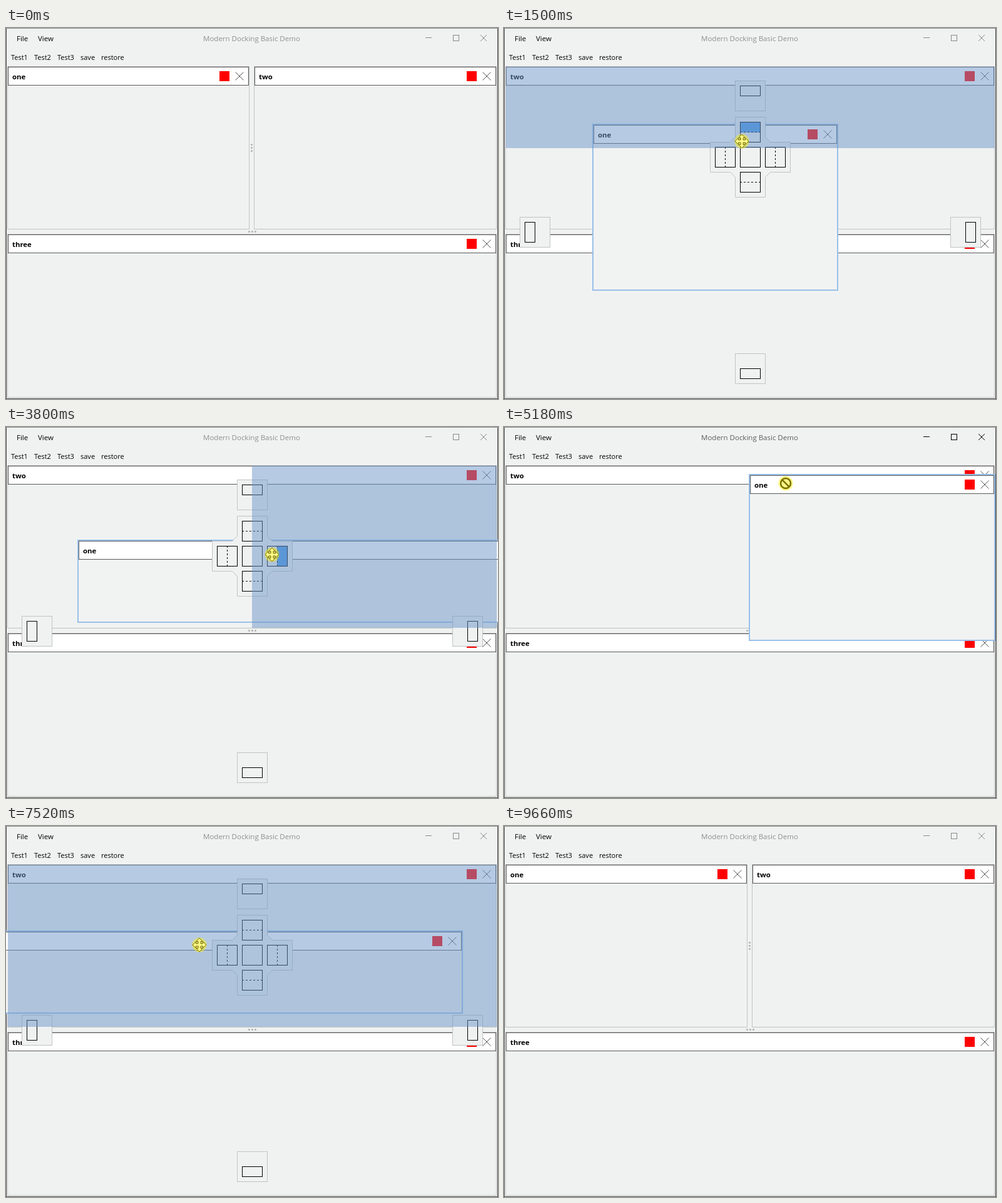
These frames come from a looping animation (786 by 593 pixels, 9760 ms). An HTML page with a canvas:

```html
<!DOCTYPE html>
<html lang="en">
<head>
<meta charset="utf-8">
<title>Docking demo</title>
<style>
html, body { margin: 0; width: 100%; height: 100%; overflow: hidden; background: #f0f2f2 }
canvas { display: block }
</style>
</head>
<body>
<canvas id="stage" width="786" height="593"></canvas>
<script>
const ctx = document.getElementById('stage').getContext('2d');
const LOOP = 9760, BG = '#f0f2f2', EDGE = '#c2c2c2', FONT = '"Open Sans", "Noto Sans", sans-serif';

const sides = { north: [0, -1], east: [1, 0], south: [0, 1], west: [-1, 0] };
const opposite = { north: 'south', east: 'west', south: 'north', west: 'east' };

// Panel slots: x, y, width, height
const whole = [2, 62, 782, 260], bottom = [2, 330, 782, 261];
const slots = {
  north: [2, 62, 782, 126], south: [2, 196, 782, 126],
  west: [2, 62, 387, 260], east: [396, 62, 388, 260]
};

// Panel "one" is dragged from its slot and dropped on another side of "two"
const drags = [
  { press: 900, drop: 2460, from: 'west', to: 'north' },
  { press: 3110, drop: 4180, from: 'north', to: 'east' },
  { press: 5110, drop: 6460, from: 'east', to: 'south' },
  { press: 7260, drop: 8660, from: 'south', to: 'west' }
];

// Pointer glides: start, end, and the point reached
const glides = [
  [50, 800, 243, 91], [900, 1050, 241, 102], [1050, 1600, 393, 188], [1600, 1850, 393, 172],
  [2740, 2950, 315, 87], [3110, 3800, 425, 204],
  [4400, 4910, 457, 78], [5110, 5420, 402, 170], [5580, 5760, 380, 242], [5760, 6300, 380, 251],
  [6640, 7060, 371, 220], [7260, 7670, 283, 177], [7900, 8240, 352, 205], [8910, 9370, 400, 620]
];

function pointer(t) {
  let x = 430, y = 620;
  for (const [start, end, toX, toY] of glides) {
    const k = Math.min(1, Math.max(0, (t - start) / (end - start)));
    const eased = k * k * (3 - 2 * k);
    x += (toX - x) * eased;
    y += (toY - y) * eased;
  }
  return [Math.round(x), Math.round(y)];
}

function fill(color, x, y, w, h) {
  ctx.fillStyle = color;
  ctx.fillRect(x, y, w, h);
}

function frame(color, x, y, w, h) {
  ctx.strokeStyle = color;
  ctx.strokeRect(x + .5, y + .5, w - 1, h - 1);
}

function line(color, x0, y0, x1, y1) {
  ctx.strokeStyle = color;
  ctx.beginPath();
  ctx.moveTo(x0, y0);
  ctx.lineTo(x1, y1);
  ctx.stroke();
}

function cross(color, x, y, size) {
  line(color, x, y, x + size, y + size);
  line(color, x + size, y, x, y + size);
}

function text(string, x, y, color = '#000', size = 11.5, weight = 400) {
  ctx.font = `${weight} ${size}px ${FONT}`;
  ctx.fillStyle = color;
  ctx.fillText(string, x, y);
}

// A polygon made by repeating one corner or arm in four quarter turns
function fourfold(points, color, outline) {
  ctx.beginPath();
  for (const [c, s] of Object.values(sides))
    for (const [x, y] of points) ctx.lineTo(x * c - y * s, x * s + y * c);
  paint(color, outline);
}

function paint(color, outline) {
  ctx.closePath();
  ctx.fillStyle = color;
  ctx.fill();
  ctx.strokeStyle = outline;
  ctx.stroke();
}

function header(name, x, y, w) {
  fill('#fff', x, y, w, 30);
  frame('#5a5a5a', x, y, w, 30);
  text(name, x + 7, y + 20, '#000', 11.4, 700);
  fill('#f00', x + w - 47, y + 7, 16, 16);
  cross('#555', x + w - 21.5, y + 8.5, 13);
}

function panel(name, [x, y, w, h]) {
  frame(EDGE, x, y - 1, w, h + 1);
  header(name, x + 1, y, w - 2);
}

function grip(x, y, [dx, dy]) {
  for (const k of [-5, 0, 5]) {
    ctx.fillStyle = '#afafaf';
    ctx.beginPath();
    ctx.arc(x + k * dx, y + k * dy, 1.5, 0, 7);
    ctx.fill();
  }
}

function mainWindow(active) {
  const ink = active ? '#000' : '#888';
  fill(BG, 0, 0, 786, 593);
  text('File', 17, 21);
  text('View', 51, 21);
  text('Modern Docking Basic Demo', 315, 21, active ? '#5c5c5c' : '#8e8e8e');
  ['Test1', 'Test2', 'Test3', 'save'].forEach((label, i) => text(label, 8 + 37 * i, 51, '#000', 11));
  text('restore', 152, 51, '#000', 11);
  fill(ink, 670, 15, 10, 1);
  frame(ink, 714, 11, 10, 10);
  cross(ink, 758, 11, 10);
  frame('#484848', 0, 0, 786, 593);
  fill('#8a8a8a', 0, 0, 786, 1);
}

function floating(x, y, [, , w, h]) {
  fill('#99c0e8', x, y, w + 6, h + 7);
  fill('#f1f2f2', x + 2, y + 2, w + 2, h + 3);
  header('one', x + 2, y + 2, w + 2);
}

// The half of a box on one side, or all of it for the center
function part(side, x, y, w, h) {
  const [dx, dy] = sides[side] || [0, 0];
  const partW = dx ? Math.ceil(w / 2) : w, partH = dy ? Math.ceil(h / 2) : h;
  return [dx > 0 ? x + w - partW : x, dy > 0 ? y + h - partH : y, partW, partH];
}

const iconBox = ([dx, dy]) => [377 + 40 * dx, 190 + 40 * dy, 33, 33];

function iconAt(px, py) {
  return Object.keys(sides).find(side => {
    const [x, y, w, h] = iconBox(sides[side]);
    return px >= x && px < x + w && py >= y && py < y + h;
  });
}

// Away from the icons, the nearest edge wins unless the pointer is well inside
function edgeAt(px, py) {
  const [x, y, w, h] = whole, u = (px - x) / w - .5, v = (py - y) / h - .5;
  if (Math.max(Math.abs(u), Math.abs(v)) <= .15) return 'center';
  if (Math.abs(u) > Math.abs(v)) return u < 0 ? 'west' : 'east';
  return v < 0 ? 'north' : 'south';
}

function handles(hovered) {
  ctx.save();
  ctx.translate(393.5, 206.5);
  fourfold([[-24, -32], [-24, -64], [24, -64], [24, -32]], BG, EDGE);
  ctx.restore();
  frame('#000', ...iconBox([0, 0]));

  for (const [side, [dx, dy]] of Object.entries(sides)) {
    const rootX = 369 + 344 * dx, rootY = 302 + 218 * dy;
    fill(BG, rootX, rootY, 49, 49);
    frame(EDGE, rootX, rootY, 49, 49);
    frame('#000', ...part(side, rootX + 8, rootY + 8, 33, 33));

    const box = iconBox([dx, dy]), midX = box[0] + 16.5, midY = box[1] + 16.5;
    if (side === hovered) fill('#4899e8', ...part(side, ...box));
    frame('#000', ...box);
    ctx.setLineDash([3, 3]);
    line('#000', midX - 16.5 * Math.abs(dy), midY - 16.5 * Math.abs(dx),
      midX + 16.5 * Math.abs(dy), midY + 16.5 * Math.abs(dx));
    ctx.setLineDash([]);
  }
}

const cursors = {
  arrow() {
    ctx.beginPath();
    for (const [x, y] of [[.5, .5], [.5, 16], [4, 12.7], [6.6, 18.5], [9, 17.5], [6.5, 11.8], [11.4, 11.8]])
      ctx.lineTo(x, y);
    paint('#fff', '#000');
  },
  move() {
    fourfold([[-2, -2], [-2, -5.5], [-5, -5.5], [0, -11], [5, -5.5], [2, -5.5]], '#fff', '#000');
  },
  blocked() {
    ctx.beginPath();
    ctx.arc(0, 0, 8, 0, 7);
    ctx.moveTo(-5.6, -5.6);
    ctx.lineTo(5.6, 5.6);
    for (const [color, width] of [['#fff', 4.5], ['#000', 2.5]]) {
      ctx.lineWidth = width;
      ctx.strokeStyle = color;
      ctx.stroke();
    }
  }
};

function drawCursor(kind, [x, y], pressed) {
  ctx.save();
  ctx.translate(x, y);
  cursors[kind]();
  if (pressed) {
    ctx.fillStyle = 'rgba(255, 240, 0, .47)';
    ctx.beginPath();
    ctx.arc(0, 0, 11.5, 0, 7);
    ctx.fill();
  }
  ctx.restore();
}

function draw(t) {
  const at = pointer(t);
  const drag = drags.find(d => t >= d.press && t < d.drop);
  const lifted = drag && t >= drag.press + 60;
  const docking = drag && t >= drag.press + 110;
  const { to: side } = drags.findLast(d => t >= d.drop) || drags[3];

  mainWindow(t >= 900 && t < 9530 && !docking);
  panel('three', bottom);
  grip(393.5, 325.5, sides.east);

  if (lifted) {
    const [px, py] = pointer(drag.press), slot = slots[drag.from];
    panel('two', whole);
    floating(slot[0] + 2 + at[0] - px, slot[1] + 1 + at[1] - py, slot);
  } else {
    panel('one', slots[side]);
    panel('two', slots[opposite[side]]);
    if (sides[side][0]) grip(392.5, 191.5, sides.south);
    else grip(393.5, 191.5, sides.east);
  }
  if (docking) {
    const hovered = iconAt(...at);
    handles(hovered);
    fill('rgba(110, 150, 200, .5)', ...part(hovered || edgeAt(...at), 3, 62, 781, 259));
  }
  drawCursor(docking ? 'move' : lifted ? 'blocked' : 'arrow', at, drag);
}

function tick() {
  draw(performance.now() % LOOP);
  requestAnimationFrame(tick);
}
tick();
</script>
</body>
</html>
```
